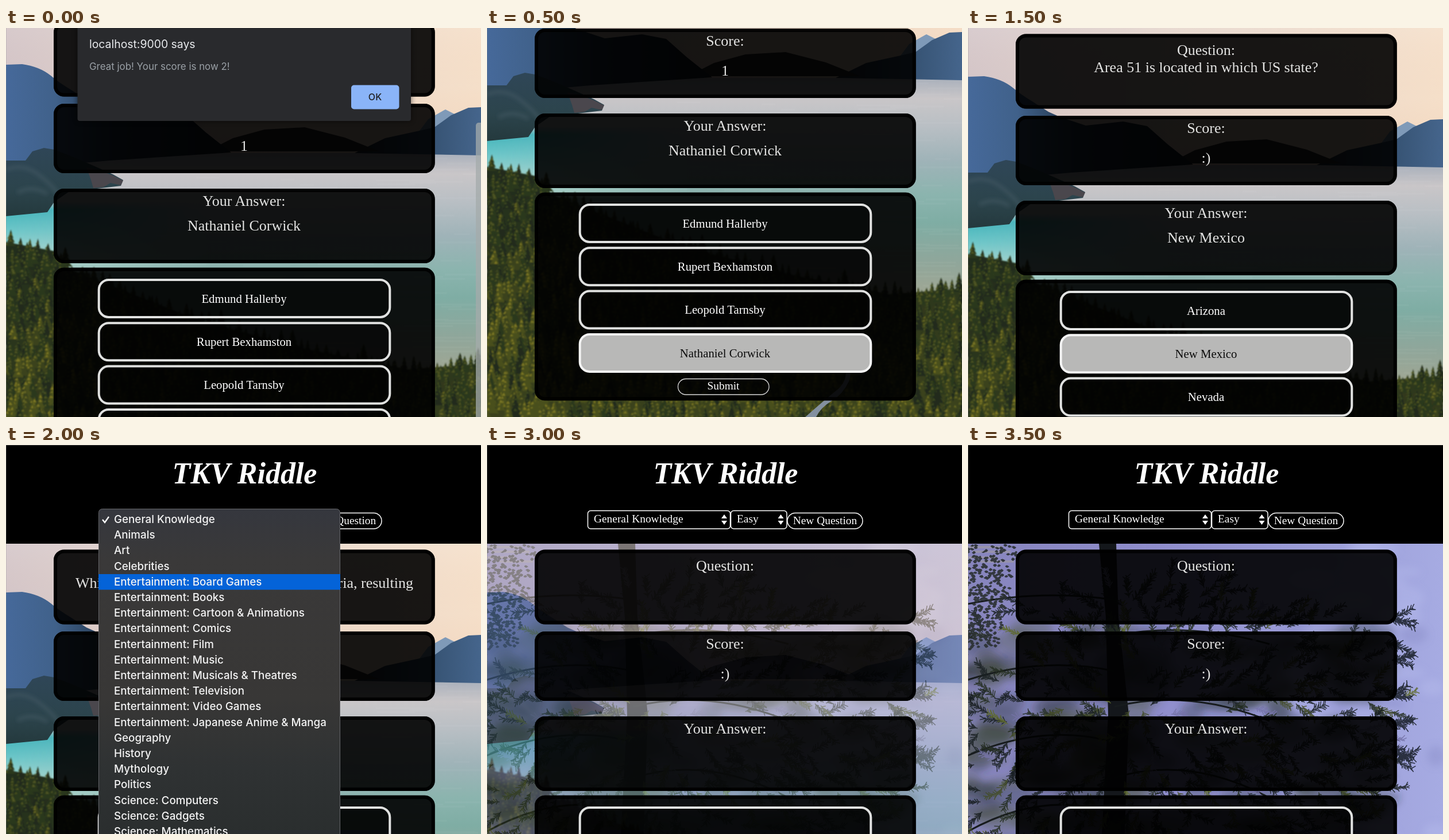
An HTML page for the animation above (4 s loop, 827x678 px).

```html
<!DOCTYPE html>
<html lang="en">
<head>
<meta charset="utf-8">
<title>Trivia</title>
<style>
html, body { margin: 0; width: 100%; height: 100%; overflow: hidden; background: #000; }
svg { display: block; width: 827px; height: 678px; }
text { font-family: "Liberation Serif", "Times New Roman", serif; fill: #fff; }
.mid { text-anchor: middle; }
.end { text-anchor: end; }
.soft { fill: #e3e3e2; }
.ui { font-family: Inter, "Open Sans", sans-serif; }
</style>
</head>
<body>
<svg id="stage" viewBox="0 0 827 678" xmlns="http://www.w3.org/2000/svg"></svg>
<script>
const PERIOD = 4000, STEP = 500;
let seed = 7;
const rnd = () => (seed = (seed * 16807) % 2147483647) / 2147483647;
const span = (a, b) => a + (b - a) * rnd();
const n1 = v => +v.toFixed(1);

const path = (d, fill, more = '') => `<path d="${d}" fill="${fill}" ${more}/>`;
const rect = (x, y, w, h, r, more) =>
  `<rect x="${x}" y="${y}" width="${w}" height="${h}" rx="${r}" ${more}/>`;
const blob = (x, y, rx, ry, fill, a) =>
  `<ellipse cx="${n1(x)}" cy="${n1(y)}" rx="${n1(rx)}" ry="${n1(ry)}" fill="${fill}" opacity="${a}"/>`;
const text = (x, y, size, str, more = '') =>
  `<text x="${x}" y="${y}" font-size="${size}" ${more}>${str}</text>`;
const gradient = (id, across, stops) =>
  `<linearGradient id="${id}" x1="0" y1="0" x2="${across ? 1 : 0}" y2="${across ? 0 : 1}">` +
  stops.map(([o, c, a = 1]) => `<stop offset="${o}" stop-color="${c}" stop-opacity="${a}"/>`).join('') +
  '</linearGradient>';
const blur = (id, size) =>
  `<filter id="${id}" x="-20%" y="-20%" width="140%" height="140%"><feGaussianBlur stdDeviation="${size}"/></filter>`;

// ---- lake landscape ----
const slope = [[0, 566], [85, 582], [112, 614], [340, 704], [530, 754], [700, 788], [827, 778]];
function treeLine(x) {
  let i = 1;
  while (i < slope.length - 1 && x > slope[i][0]) i++;
  const [x0, y0] = slope[i - 1], [x1, y1] = slope[i];
  return y0 + (y1 - y0) * (x - x0) / (x1 - x0);
}
function conifer(x, y, h, w) {
  const right = [], left = [];
  for (let i = 1; i <= 4; i++) {
    const ty = n1(y - h + h * i / 4), tw = w * i / 4;
    right.push(`${n1(x + tw)} ${ty}`, `${n1(x + tw * .55)} ${ty - 1}`);
    left.unshift(`${n1(x - tw * .55)} ${ty - 1}`, `${n1(x - tw)} ${ty}`);
  }
  return `M${n1(x)} ${n1(y - h)}L${right.join('L')}L${left.join('L')}Z`;
}
function forest() {
  const dark = ['#212b1a', '#2c371a', '#3a431b', '#4a4f1b'];
  const lit = ['#3d4820', '#505722', '#676722', '#7d7824'];
  const base = 'M' + slope.map(p => p.join(' ')).join('L') + 'L827 1010L0 1010Z';
  let out = path(base, 'url(#floor)');
  for (let k = 0; k < 27; k++) {
    const body = ['', '', '', ''], glow = ['', '', '', ''];
    for (let x = -4; x < 834; x += span(8, 18)) {
      const y = treeLine(Math.max(0, Math.min(827, x))) + 12 + k * 16 + span(-9, 9);
      if (y > 1040) continue;
      const h = span(20, 36) + k * .4, w = h * span(.24, .36);
      const shade = Math.min(3, Math.floor(rnd() * (1.8 + k / 6)));
      body[shade] += conifer(x, y, h, w);
      for (let j = 0; j < 4; j++)
        glow[shade] += `M${n1(x + span(-w, w * .3) * (j + 1) / 5)} ${n1(y - h + h * (j + .8) / 5)}l${n1(span(-5, -2))} ${n1(span(3, 6))}h${n1(span(4, 7))}z`;
    }
    for (let i = 0; i < 4; i++) out += path(body[i], dark[i]) + path(glow[i], lit[i]);
  }
  return `<g filter="url(#haze1)">${out}</g>`;
}
function ripples() {
  let d = '';
  for (let i = 0; i < 170; i++)
    d += `M${n1(span(0, 800))} ${n1(span(420, 790))}h${n1(span(20, 110))}`;
  return path(d, 'none', 'stroke="#fff" stroke-opacity=".03" stroke-width="3"');
}
function lake() {
  return rect(0, 172, 827, 245, 0, 'fill="url(#sky)"') +
    rect(0, 172, 827, 245, 0, 'fill="url(#haze)"') +
    rect(0, 411, 827, 600, 0, 'fill="url(#water)"') + ripples() +
    `<g mask="url(#fade)">${rect(0, 495, 360, 125, 0, 'fill="url(#shallow)"')}</g>` +
    path('M690 412L735 352L765 335L785 345L827 380V412Z', '#7f9ab8') +
    path('M607 411L660 385L720 372L746 366L775 345L805 332L827 331V415Z', 'url(#ridge)') +
    path('M350 408L395 385L450 370L520 366L590 384L650 408Z', '#24242a') +
    path('M0 257L28 256Q58 260 78 276Q92 288 112 300L140 318L160 327L205 342L270 335L312 343L348 375L392 410L180 424L0 440Z', 'url(#peak)') +
    path('M0 424L34 424L46 408L66 402L84 405L118 418L150 432L186 448L204 458L200 468L150 474L110 478L84 496L72 514L0 521Z', 'url(#cliff)') +
    path('M140 436L162 441L186 450L204 459L200 467L182 463L170 470L152 472L148 458Z', '#54494c', 'opacity=".75"') +
    `<g filter="url(#haze3)">${path('M0 440q30 -12 56 8t34 34M20 480q24 -14 52 2', 'none', 'stroke="#4d6570" stroke-width="7" opacity=".35"')}</g>` +
    forest() +
    path('M552 1004Q588 972 608 956T624 918T606 880L612 880Q640 918 630 940T600 974T572 1004Z', '#8390a0');
}

// ---- branches over lavender water ----
function sprig(x, y, angle, len) {
  const cx = Math.cos(angle), cy = Math.sin(angle);
  let d = `M${n1(x)} ${n1(y)}l${n1(cx * len)} ${n1(cy * len)}`;
  for (let s = 3; s < len; s += 3) {
    for (const side of [-1, 1]) {
      const a = angle + side * span(.3, 1.1), l = span(4, 11);
      d += `M${n1(x + cx * s)} ${n1(y + cy * s)}l${n1(Math.cos(a) * l)} ${n1(Math.sin(a) * l)}`;
    }
  }
  return d;
}
function crown(count, size) {
  let d = '';
  for (let i = 0; i < count; i++) {
    const a = span(0, 6.28), r = Math.sqrt(rnd());
    const x = 340 + Math.cos(a) * r * 425, y = 500 + Math.sin(a) * r * 270;
    d += sprig(x, y, Math.atan2(y - 460, x - 300) + span(-.9, .9), span(size * .6, size));
  }
  return d;
}
function branches() {
  let out = rect(0, 172, 827, 530, 0, 'fill="url(#lavender)"');
  let pale = '', murk = '', leaf = '';
  for (let i = 0; i < 40; i++)
    pale += blob(span(560, 830), span(180, 690), span(15, 45), span(6, 20), i % 3 ? '#bcc2f2' : '#7f83bd', .3);
  for (let i = 0; i < 150; i++)
    murk += blob(span(-30, 710), span(315, 700), span(20, 60), span(8, 24), i % 3 ? '#252e2a' : '#434c28', .3);
  out += `<g filter="url(#haze7)">${pale}${murk}</g>`;
  out += path('M228 172L258 172L262 300L280 470L272 700L232 700L244 470L240 300Z', '#14171b');
  for (let j = 0; j < 7; j++) {
    const y = 270 + j * 62, dir = j % 2 ? 1 : -1;
    out += path(`M255 ${y}q${dir * 130} -${20 + j * 4} ${dir * 270} ${10 + j * 5}`, 'none', 'stroke="#171b1d" stroke-width="3"');
  }
  const layers = [['#1b2224', 170], ['#7674a8', 40], ['#242d20', 130], ['#434d28', 80], ['#5f6a2c', 35], ['#161c1e', 90]];
  for (const [tone, count] of layers)
    out += path(crown(count, 42), 'none', `stroke="${tone}" stroke-width="1.5" opacity=".85"`);
  let edge = '';
  for (const [x, y] of [[735, 305], [725, 345], [738, 375], [728, 435], [738, 485], [735, 530], [745, 550]])
    for (let i = 0; i < 3; i++) edge += sprig(x, y, span(-.6, .6), span(24, 46));
  out += path(edge, 'none', 'stroke="#2a3040" stroke-width="1.5"');
  for (let i = 0; i < 330; i++) {
    const y = span(174, 355), x = span(-4, 84 - (y - 176) * .2);
    leaf += `M${n1(x)} ${n1(y)}q${n1(span(1, 5))} -5 ${n1(span(5, 9))} 0q-4 ${n1(span(3, 7))} -7 0z`;
  }
  return out + path('M0 178h60M8 186h66M0 196h48M22 203h58', 'none', 'stroke="#a19c9f" stroke-width="4" opacity=".6"') +
    path(leaf, '#2b3031', 'opacity=".9"');
}

// ---- page ----
const panels = [[182.6, 130], [325, 121], [473, 130], [610.7, 362.6]];
const panel = ([y, h]) =>
  rect(83, y, 663.7, h, 18, 'fill="#000" fill-opacity=".9"') +
  rect(86, y + 3, 657.7, h - 6, 15, 'fill="none" stroke="#000" stroke-width="6" stroke-opacity=".9"');
const arrows = x => path(`M${x - 5} 128l5 -7l5 7zM${x - 5} 132l5 7l5 -7z`, '#fff');
const line = 'fill="none" stroke="#fff" stroke-width="1.5"';

function header() {
  return rect(0, 0, 827, 172, 0, 'fill="#000"') +
    rect(0, 0, 827, 1, 0, 'fill="#3c3c3c"') +
    text(415.5, 66.5, 52, 'TKV Riddle', 'class="mid" font-weight="bold" font-style="italic"') +
    rect(175.5, 114.5, 248, 31.5, 5, line) + text(186, 135, 19.4, 'General Knowledge') + arrows(413) +
    rect(424.5, 114.5, 97.5, 31.5, 5, line) + text(435, 135, 19.4, 'Easy') + arrows(511.5) +
    rect(523, 118.5, 131, 27.5, 13.7, line) + text(588.5, 137.5, 19.4, 'New Question', 'class="mid"');
}

function body(s) {
  let out = panels.map(panel).join('') +
    text(414.5, 219, 26, 'Question:', 'class="mid soft"') +
    text(414.5, 354.7, 26, 'Score:', 'class="mid soft"') +
    text(414.5, 406.7, 26, s.score, 'class="mid soft"') +
    text(414.5, 503, 26, 'Your Answer:', 'class="mid soft"') +
    text(414.5, 545.7, 26, s.answer || '', 'class="mid soft"');
  if (s.menu)
    out += text(121, 249, 26, 'Which ruler', 'class="soft"') + text(709, 249, 26, 'Bavaria, resulting', 'class="soft end"');
  else
    out += text(414.5, 249, 26, s.question || '', 'class="mid soft"');
  for (let i = 0; i < 4; i++) {
    const y = 630 + i * 75.3, on = s.pick === i;
    out += rect(161.7, y + 2, 506.6, 65, 17, `fill="${on ? '#b8b8b7' : '#000'}" fill-opacity="${on ? 1 : .35}" stroke="${on ? '#f4f4f4' : '#e0e1e0'}" stroke-width="4"`) +
      text(414.5, y + 41.7, 20.75, (s.options || [])[i] || '', `class="mid" ${on ? 'style="fill:#0b0b0b"' : ''}`);
  }
  return out + rect(332.5, 935.5, 158.5, 27.5, 13.7, 'fill="none" stroke="#d8d8d8" stroke-width="1.3"') +
    text(411.5, 954, 19.4, 'Submit', 'class="mid"');
}

const topics = ['General Knowledge', 'Animals', 'Art', 'Celebrities',
  ...['Board Games', 'Books', 'Cartoon &amp; Animations', 'Comics', 'Film', 'Music', 'Musicals &amp; Theatres',
    'Television', 'Video Games', 'Japanese Anime &amp; Manga'].map(t => 'Entertainment: ' + t),
  'Geography', 'History', 'Mythology', 'Politics',
  ...['Computers', 'Gadgets', 'Mathematics'].map(t => 'Science: ' + t)];

const menu = () =>
  rect(161.5, 111.5, 420, 600, 6, 'fill="url(#menu)" stroke="#65666a"') +
  rect(161, 225, 421, 27.3, 0, 'fill="#0463d8"') +
  path('M168 130l4 5l7 -10', 'none', 'stroke="#fff" stroke-width="2.3"') +
  topics.map((t, i) => text(188, n1(136 + i * 27.2), 18.8, t, 'class="ui" font-weight="500" style="fill:#f3f3f3"')).join('');

const dialog = score =>
  rect(124.5, -10, 580.5, 172, 4, 'fill="#000" opacity=".55" filter="url(#haze5)"') +
  rect(124.5, -10, 580.5, 172, 4, 'fill="#292a2d"') +
  text(145, 35, 19.4, 'localhost:9000 says', 'class="ui" style="fill:#e8eaed"') +
  text(145, 72.5, 16.9, `Great job! Your score is now ${score}!`, 'class="ui" style="fill:#9aa0a6"') +
  rect(601, 99.5, 83.5, 42, 5, 'fill="#8ab4f8"') +
  text(642.5, 126, 16, 'OK', 'class="ui mid" font-weight="500" style="fill:#202124"');

// ---- states, one per step ----
const people = ['Edmund Hallerby', 'Rupert Bexhamston', 'Leopold Tarnsby', 'Nathaniel Corwick'];
const states = ['Arizona', 'New Mexico', 'Nevada', 'Utah'];
const area = { options: states, question: 'Area 51 is located in which US state?', score: ':)' };
const blank = { scroll: 0, score: ':)' };
const steps = [
  { scroll: 193, options: people, score: '1', answer: people[3], alert: 2, bar: true },
  { scroll: 324, options: people, score: '1', answer: people[3], pick: 3 },
  { ...area, scroll: 193, answer: 'Nevada', alert: 1 },
  { ...area, scroll: 172, answer: 'New Mexico', pick: 1 },
  { ...blank, menu: true },
  blank,
  { ...blank, mix: .5 },
  { ...blank, mix: 1 }
];

const stage = document.getElementById('stage');
stage.innerHTML = '<defs>' +
  gradient('sky', true, [[0, '#d3c5c8'], [.45, '#e6d6cc'], [1, '#f5dfc9']]) +
  gradient('haze', false, [[0, '#fff', .12], [.5, '#f0c8a8', 0], [1, '#efc3a4', .35]]) +
  gradient('water', false, [[0, '#a9b0bb'], [.06, '#c9c6c8'], [.14, '#b9bfc4'], [.24, '#9fb3b8'],
    [.34, '#8bb4ae'], [.42, '#7fada4'], [.54, '#90a69a'], [.64, '#a2a793'], [1, '#8a967c']]) +
  gradient('shallow', false, [[0, '#3fb0b8', 0], [.12, '#43b4bb'], [.4, '#6cc6c8'], [.75, '#a9d6d0'], [1, '#a9cfc6']]) +
  gradient('clear', true, [[0, '#fff'], [.25, '#fff', .9], [1, '#fff', 0]]) +
  `<mask id="fade" maskUnits="userSpaceOnUse" x="0" y="490" width="360" height="140">${rect(0, 490, 360, 140, 0, 'fill="url(#clear)"')}</mask>` +
  gradient('ridge', true, [[0, '#1d2733'], [.55, '#34506f'], [1, '#45658c']]) +
  gradient('peak', true, [[0, '#46699a'], [.22, '#40618a'], [.5, '#1f3145'], [1, '#121b24']]) +
  gradient('cliff', false, [[0, '#2f4657'], [.6, '#2c444c'], [1, '#24393d']]) +
  gradient('floor', false, [[0, '#222d1b'], [1, '#3b421a']]) +
  gradient('lavender', true, [[0, '#8785bd'], [.4, '#8f8dcc'], [1, '#a6abe2']]) +
  gradient('menu', false, [[0, '#35373e'], [.15, '#3a3939'], [.55, '#383736'], [.75, '#2f3233'], [1, '#292d2d']]) +
  blur('haze1', 1.1) + blur('haze3', 3) + blur('haze5', 5) + blur('haze7', 7) + '</defs>' +
  `<g id="page"><g id="lake">${lake()}</g><g id="wood">${branches()}</g>${header()}<g id="body"></g></g>` +
  '<g id="over"></g>' + rect(0, 0, 1, 678, 0, 'fill="#999" opacity=".3"');

const $ = id => document.getElementById(id);
let shown = -1;

function show(i) {
  const s = steps[i], mix = s.mix || 0;
  $('page').setAttribute('transform', `translate(0 ${-s.scroll})`);
  $('lake').style.display = mix === 1 ? 'none' : '';
  $('wood').style.display = mix ? '' : 'none';
  $('wood').style.opacity = mix;
  $('body').innerHTML = body(s);
  $('over').innerHTML = (s.menu ? menu() : '') + (s.alert ? dialog(s.alert) : '') +
    (s.bar ? rect(818, 165, 13, 530, 5, 'fill="#a5abab" opacity=".75"') : '');
}
function tick() {
  const i = Math.floor(performance.now() % PERIOD / STEP);
  if (i !== shown) show(shown = i);
  requestAnimationFrame(tick);
}
tick();
</script>
</body>
</html>
```
